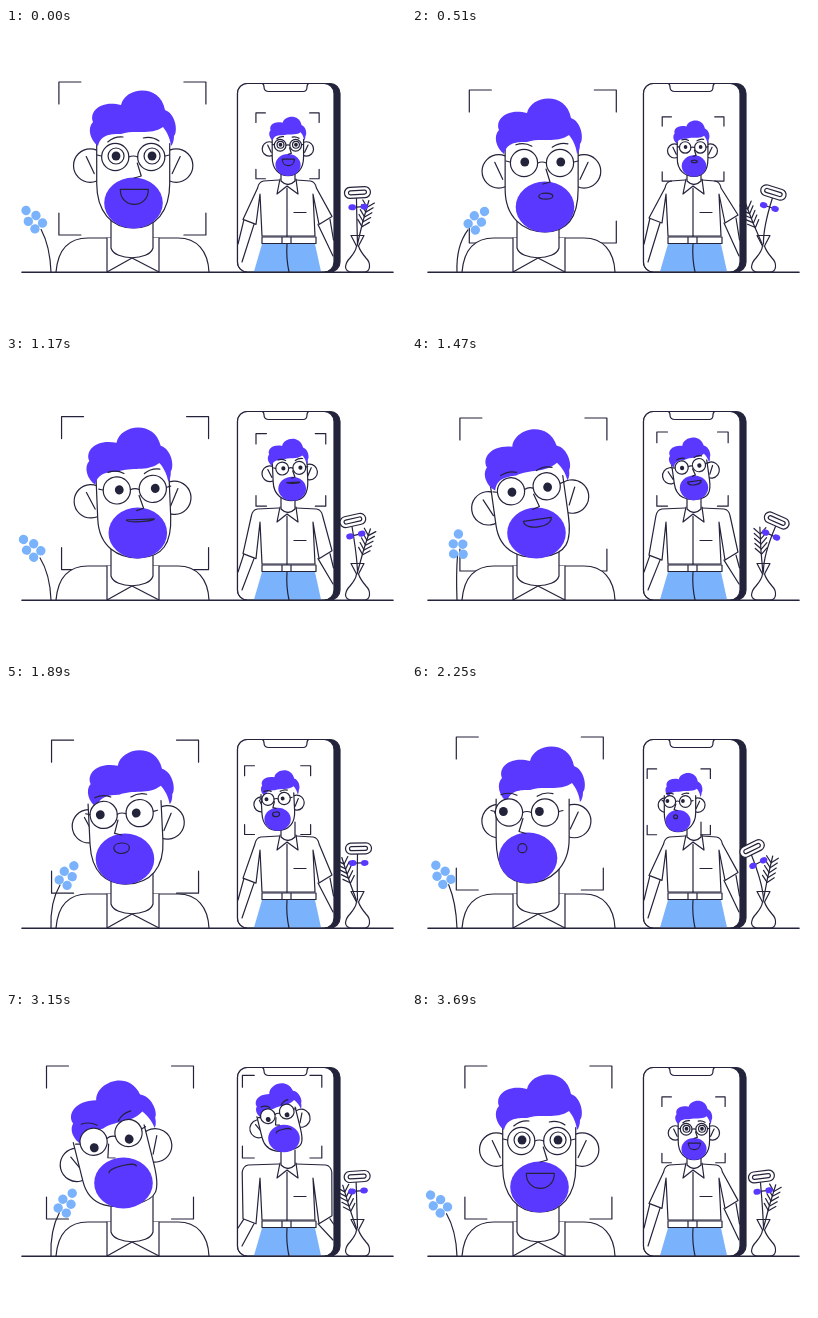
Animation, 400 px wide and 300 px high, one loop 3.72 s. Source, as an HTML page with a canvas:

```html
<!DOCTYPE html>
<html>
<head>
<meta charset="utf-8">
<style>
html, body { margin: 0; width: 100%; height: 100%; overflow: hidden; background: #fff }
canvas { display: block }
</style>
</head>
<body>
<canvas id="stage" width="400" height="300"></canvas>
<script>
const c = document.getElementById('stage').getContext('2d');
const INK = '#23233b', PURPLE = '#5a38ff', BLUE = '#7ab2fb', LOOP = 3720, SWAY = 1240;

// Each pose overrides the smiling rest pose; everything else on the face follows from these.
const rest = {
  t: 0, tilt: 0, hairX: 127, hairY: 90, beardX: 127.5, beardY: 175,
  zoom: .43, mouthW: 14, mouthLow: 20, lookX: 1, lookY: -1
};
const poses = [
  rest,
  { t: 510, hairY: 98, beardX: 133, beardY: 179, zoom: .42, mouthW: 7, mouthLow: 4 },
  { t: 930, hairY: 98, beardX: 135, beardY: 177, zoom: .47, mouthLow: 0, lookX: 4 },
  { t: 1470, tilt: -8, hairX: 114, hairY: 102, beardX: 124.5, beardY: 177, zoom: .485, mouthLow: 10, lookY: 1 },
  { t: 2250, hairX: 130, beardX: 116, beardY: 174, mouthW: 4.5, mouthLow: 6, lookX: -7 },
  { t: 3150, tilt: -14, hairX: 105, hairY: 98, beardX: 117.5, beardY: 171, zoom: .54, mouthLow: -5, lookX: -1, lookY: 6 },
  { t: 3690 }
].map(pose => ({ ...rest, ...pose }));

const clamp = (v, low, high) => Math.min(high, Math.max(low, v));

function poseAt(t) {
  const next = poses.findIndex(p => p.t > t);
  if (next < 0) return poses[0];
  const a = poses[next - 1], b = poses[next];
  const u = clamp(((t - a.t) / (b.t - a.t) - .15) / .7, 0, 1);
  const k = u < .5 ? 4 * u ** 3 : 1 - 4 * (1 - u) ** 3;
  return Object.fromEntries(Object.keys(rest).map(f => [f, a[f] + (b[f] - a[f]) * k]));
}

function draw(d, fill, stroke = INK) {
  const path = new Path2D(d);
  if (fill) { c.fillStyle = fill; c.fill(path); }
  if (stroke) { c.strokeStyle = stroke; c.stroke(path); }
}

function oval(x, y, rx, ry, fill, stroke = INK) {
  c.beginPath();
  c.ellipse(x, y, rx, ry, 0, 0, 7);
  if (fill) { c.fillStyle = fill; c.fill(); }
  if (stroke) { c.strokeStyle = stroke; c.stroke(); }
}

function at(x, y, angle, paint) {
  c.save();
  c.translate(x, y);
  c.rotate(angle);
  paint();
  c.restore();
}

function box(x, y, w, h, r, fill) {
  c.beginPath();
  c.roundRect(x, y, w, h, r);
  c.fillStyle = fill;
  c.fill();
  c.strokeStyle = INK;
  c.stroke();
}

function brackets(p) {
  const x = .8 * p.beardX + .2 * p.hairX - 74.5;
  const y = p.beardY + p.hairY / 2 - 166;
  at(x, y, 0, () => draw('M0,22V0H22M125,0H147V22M147,131V153H125M22,153H0V131', null));
}

function glasses(p) {
  const nose = clamp(p.lookX, -1, 1), brow = .25 - p.mouthLow / 40;
  draw(`M${nose * 4},6L${nose * 8},19L${nose},21`, null);
  for (const side of [-1, 1]) {
    const x = side * 18, pupilX = x + p.lookX * .8;
    oval(x, 0, 13.6, 13.6, '#fff');
    if (p.mouthLow > 12) oval(pupilX, p.lookY, 8, 8, null);
    oval(pupilX, p.lookY, 4.4, 4.6, INK, null);
    draw(`M${side * 32},-1L${side * 36},-2`, null);
    at(x, -18, -side * brow, () => draw('M-8,1Q0,-3 8,0', null));
  }
  draw('M-4.4,0Q0,-2 4.4,0', null);
}

function mouth({ mouthW: w, mouthLow: low }) {
  const top = low < 0 ? low : -low * clamp((14 - w) / 7, 0, 1);
  draw(`M${-w},0C${-w},${top} ${w},${top} ${w},0C${w},${low} ${-w},${low} ${-w},0Z`, null);
}

function head(p) {
  const tilt = p.tilt * Math.PI / 180;
  const earX = p.hairX * .6 + p.beardX * .4;
  const earY = p.hairY + (p.beardY - p.hairY) * .56 - p.tilt * .3;
  const glassX = (p.hairX + p.beardX) / 2 + p.lookX - 1 + p.tilt * .3;
  const glassY = (p.hairY + p.beardY) / 2 - 3.5 + p.tilt * .4;
  const spread = 43 - .55 * Math.abs(glassX - earX);
  const faceX = earX * .6 + glassX * .4;

  at(earX, earY, tilt, () => {
    for (const side of [-1, 1]) {
      oval(side * spread, 0, 16.7, 16.7, '#fff');
      draw(`M${side * (spread + 4)},-9L${side * (spread - 4)},8`, null);
    }
  });
  at(faceX, earY, tilt, () => {
    const chin = p.beardX - faceX, low = p.beardY + 25 - earY;
    draw(`M-36.5,-22V18C-36.5,46 ${chin - 22},${low} ${chin},${low}S36.5,46 36.5,18V-22`, '#fff');
  });
  at(p.hairX, p.hairY, tilt, () =>
    draw('M-35,28C-43,22 -46,10 -40,4C-44,-6 -33,-18 -12,-13C-8,-31 27,-35 32,-8' +
      'C43,-4 45,14 41,18C41,22 40,26 38,28C37,20 34,14 30,9C17,18 2,11 -12,16C-22,16 -32,16 -35,28Z', PURPLE, null));
  oval(p.beardX, p.beardY, 29.3, 25.5, PURPLE, null);
  at(glassX, glassY, tilt, () => glasses(p));
  at(p.beardX + p.lookX * .8, p.beardY - 8 - .4 * p.mouthW, tilt, () => mouth(p));
}

function portrait(p) {
  brackets(p);
  draw('M50,244C52,221 63,210 82,210H172C191,210 202,223 203,244', '#fff');
  draw('M101,210V244L126,230L153,244V210', '#fff');
  draw('M105,180V220C109,233 143,233 147,220V180', '#fff');
  head(p);
}

function phone(p) {
  const width = 27 + (p.zoom - .42) * 140;
  const left = 281 - width, right = 281 + width, elbow = 163 + width;
  box(231.5, 55.5, 102.5, 188.5, 10, INK);
  box(231.5, 55.5, 96.5, 188.5, 10, '#fff');
  draw('M256,55.5Q258,56 258,59Q258,63.5 263,63.5H297Q301,63.5 301,59Q301,56 303,55.5', null);

  draw('M256,216H309L315,243.5H248Z', BLUE, null);
  draw(`M281,216Q280,230 283,244M238,${elbow}L232,216M248,${elbow + 5}L236,234` +
    `M324,${elbow}L327.5,212M312,${elbow + 5}L327,228`, null);
  draw(`M273,152L${left + 5},153Q${left},154 ${left - 1},160L237,${elbow}L250,${elbow + 5}L254,166L256,208H309L307,166` +
    `L313,${elbow + 5}L326,${elbow - 3}L${right + 1},160Q${right},154 ${right - 5},153L290,152`, '#fff');
  draw('M256,209H310V215.5H256ZM276,209V215.5M285,209V215.5M281,160V208M288,184.5H300', null);
  draw('M275,138V153Q282,160 289,153V138', '#fff');
  draw('M274,151L271,166L281,158L292,166L290,151', null);

  c.save();
  c.translate(280 + 2 * p.lookX, 137 - (p.zoom - .43) * 95);
  c.scale(p.zoom, p.zoom);
  c.translate(-p.beardX, -p.beardY);
  c.lineWidth /= p.zoom;
  brackets(p);
  head(p);
  c.restore();
}

function flower(lean) {
  const x = 45 - 21 * lean, y = 188 + 3 * lean * lean;
  draw(`M45,244Q44,218 ${x + 10 * lean},${y + 11}`, null);
  at(x, y, -.73 * lean, () => {
    oval(0, -10, 4.7, 4.7, BLUE, null);
    for (const dy of [0, 10])
      for (const side of [-1, 1]) oval(side * 4.8 + dy / 15, dy, 4.7, 4.7, BLUE, null);
  });
}

function vase(swing, lean) {
  const x = 353 + 13.5 * swing;
  draw(`M351.5,216Q351,200 ${x - 1},170`, null);
  at(351, 218, .34 * lean - .05, () => {
    draw('M0,0Q-1,-24 0,-47', null);
    for (let y = -20; y > -44; y -= 5) draw(`M-6,${y - 6}L0,${y}L6,${y - 6}`, null);
  });
  at(353 + 7 * swing, 179, .5 * swing, () => {
    draw('M-5,0H5', null);
    for (const side of [-1, 1]) oval(side * 6, 0, 3.8, 3, PURPLE, null);
  });
  at(x, 164.5, .48 * swing, () => {
    box(-13, -5.5, 26, 11, 5.5, '#fff');
    box(-9, -2, 18, 4, 2, '#fff');
  });
  draw('M345,207.5H358L352.5,218Q354,223 360,230Q364,234 363.5,239Q363,244 358,244H346Q340,244 339.5,239Q340,234 344,230Q350,223 350.5,218Z', null);
}

function render(now) {
  const t = now % LOOP, phase = t / SWAY * 2 * Math.PI, p = poseAt(t);
  const lean = Math.cos(phase + .45), swing = Math.sin(phase - .12);
  c.fillStyle = '#fff';
  c.fillRect(0, 0, 400, 300);
  c.lineWidth = 1.2;
  c.lineJoin = c.lineCap = 'round';
  portrait(p);
  phone(p);
  vase(swing, lean);
  flower(lean);
  c.lineWidth = 1.6;
  draw('M16,244.2H387', null);
  requestAnimationFrame(() => render(performance.now()));
}
render(0);
</script>
</body>
</html>
```
